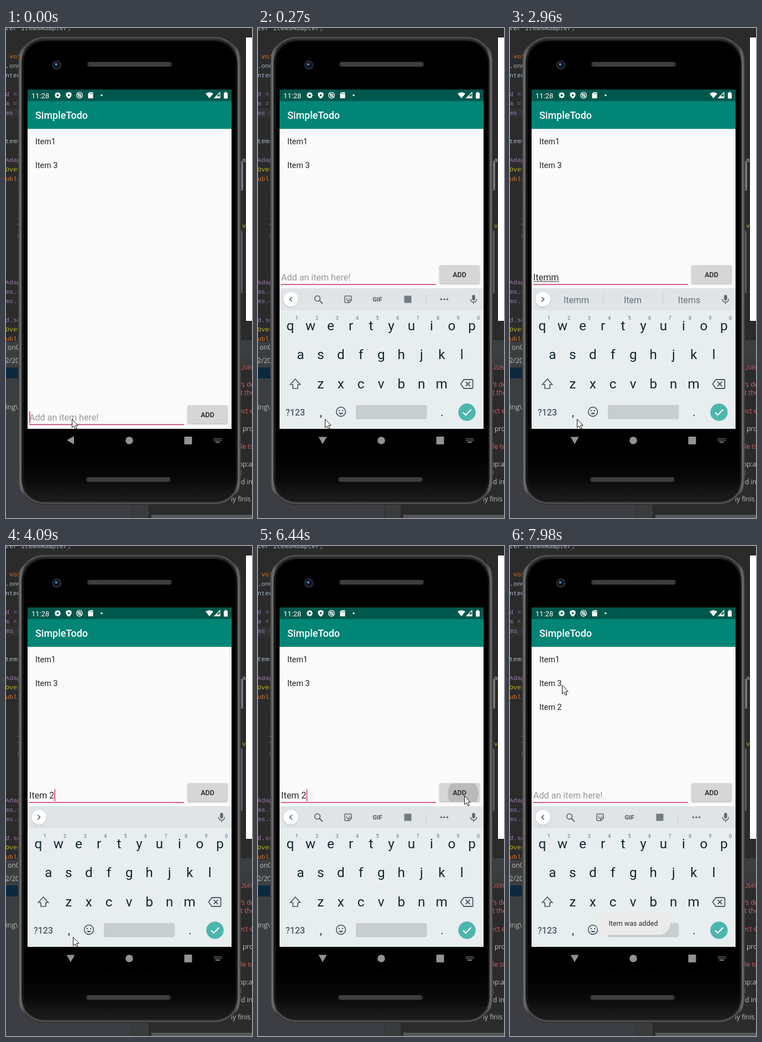
Recreate the animation shown at these times as an HTML page with a canvas. Size 445x885 px, loop 8000 ms.

```html
<!DOCTYPE html>
<html lang="en">
<head>
<meta charset="utf-8">
<title>Todo list</title>
<style>
html, body { margin: 0; width: 100%; height: 100%; overflow: hidden; background: #2b2b2b; }
canvas { display: block; }
</style>
</head>
<body>
<canvas id="stage" width="445" height="885"></canvas>
<script>
const c = document.getElementById('stage').getContext('2d');
const LOOP = 8000;
const ROBOTO = 'Roboto, sans-serif';
const MONO = '"Liberation Mono", monospace';
const SANS = '"Open Sans", sans-serif';
const ICON = '#5c686e';

// Step tracks: [start time, value...]
const typed = [[0, ''], [1700, 'I'], [1940, 'It'], [2090, 'Ite'], [2400, 'Itemm'],
  [3390, 'Item'], [3940, 'Item '], [4090, 'Item 2'], [6590, '']];
const strips = [[0, null], [1820, ['I', 'I\'m', 'I\'ll']], [1940, ['It', 'It\'s', 'Its']],
  [2090, ['Ite', 'Item', 'Its']], [2400, ['Itemm', 'Item', 'Items']],
  [3390, ['Items', 'Item', 'Item\'s']], [4090, []], [4240, null]];
const caretToggles = [270, 830, 1270, 1700, 2960, 3390, 3820, 3940, 4520, 5030, 5540, 6010, 7010, 7430, 7980];
const pointer = [[0, 119, 706], [120, 121, 706], [4790, 205, 640], [4910, 325, 548], [5030, 405, 469],
  [5180, 412, 467], [5300, 403, 458], [5420, 386, 453], [5540, 373, 451],
  [7160, 232, 330], [7280, 105, 228], [7580, 98, 241], [7700, 94, 251]];
const ripples = [[0, 0, 0], [6440, 28, .13], [6590, 38, .13], [6740, 44, .07], [6860, 0, 0]];
const toasts = [[0, 0], [6590, .3], [6740, .6], [6860, .85], [7010, 1]];

const at = (track, t) => track.findLast(step => step[0] <= t);

function rect(x, y, w, h, fill) {
  c.fillStyle = fill;
  c.fillRect(x, y, w, h);
}
function round(x, y, w, h, r, fill) {
  c.beginPath();
  c.roundRect(x, y, w, h, r);
  c.fillStyle = fill;
  c.fill();
}
function disc(x, y, r, fill) {
  c.beginPath();
  c.arc(x, y, r, 0, 7);
  c.fillStyle = fill;
  c.fill();
}
function ring(x, y, r, color, width = 1.6) {
  c.beginPath();
  c.arc(x, y, r, 0, 7);
  c.strokeStyle = color;
  c.lineWidth = width;
  c.stroke();
}
function path(d, color, width, x = 0, y = 0) {
  c.save();
  c.translate(x, y);
  const p = new Path2D(d);
  if (width) {
    c.strokeStyle = color;
    c.lineWidth = width;
    c.stroke(p);
  } else {
    c.fillStyle = color;
    c.fill(p);
  }
  c.restore();
}
function text(s, x, y, size, color, align = 'left', weight = 400, family = ROBOTO) {
  c.font = `${weight} ${size}px ${family}`;
  c.textAlign = align;
  c.fillStyle = color;
  c.fillText(s, x, y);
}

function drawEditor() {
  rect(0, 0, 445, 885, '#2b2b2b');
  rect(0, 145, 35, 17, '#323232');
  const plain = '#a9b7c6', violet = '#9876aa', orange = '#cc7832', yellow = '#bbb529';
  const code = [
    ['ter itemsAdapter;', 4, plain], [' voi', 55, orange], ['.onC', 72, plain], ['nten', 89, plain],
    ['d =', 123, violet], ['m =', 140, violet], ['ms =', 157, violet], ['tems', 208, plain],
    ['Adap', 242, violet], ['Over', 259, yellow], ['ubli', 276, orange],
    ['   i', 293, plain], ['   .', 310, plain], ['   .', 327, plain], ['   i', 344, plain],
    ['   T', 361, plain], ['   s', 378, plain], ['Adap', 463, violet], ['ms.s', 480, violet],
    ['ms.s', 497, violet], ['d.se', 531, violet], ['Over', 548, yellow], ['ubli', 565, orange]
  ];
  for (const [s, y, color] of code) text(s, -1, y, 11.7, color, 'left', 400, MONO);

  rect(0, 567, 40, 318, '#3c3f41');
  rect(0, 588, 40, 1, '#303234');
  rect(0, 613, 30, 20, '#0d293e');
  text('onC', 3, 581, 12, '#bbbbbb', 'left', 400, SANS);
  text('22/20', -8, 605, 12, '#bbbbbb', 'left', 400, SANS);
  text('ing\\', 0, 689, 12, '#bbbbbb', 'left', 400, SANS);
  rect(0, 820, 229, 65, '#3d3e43');
  rect(228, 850, 30, 35, '#393b3d');
  rect(228, 850, 1, 35, '#2e3032');
  rect(263, 879, 182, 6, '#555759');

  rect(433, 16, 12, 514, '#111');
  rect(434, 17, 11, 512, '#fff');
  text('a', 427, 242, 11.7, plain, 'left', 400, MONO);
  text('v', 427, 361, 11.7, yellow, 'left', 400, MONO);
  rect(410, 564, 35, 25, '#3c3f41');
  rect(410, 589, 35, 22, '#393b3d');
  const log = [['user', 617, 1, 423], ["'s de", 648, 1, 424], ['t the', 663, 1, 424], ['ect e', 696, 1, 421],
    ['proj', 728, 0, 428], ['ble to', 760, 1, 417], ['op:a', 792, 0, 421], ['d', 808, 0, 419],
    ['d in', 824, 0, 425], ['ly finis', 855, 0, 407]];
  for (const [s, y, red, x] of log) text(s, x, y, 12, red ? '#d8605f' : '#c0c0c0', 'left', 400, SANS);
}

function drawSpeaker(x, y) {
  round(x, y, 153, 9, 4.5, '#353535');
  c.setLineDash([1, 2]);
  path('M4 3H149M5 6H149', '#858585', 1, x, y);
  c.setLineDash([]);
}

function drawPhone() {
  round(422, 240, 7, 54, 2, '#66686a');
  round(422, 366, 6, 113, 2, '#5b5d5f');
  rect(427, 244, 1, 46, '#999');
  const metal = c.createLinearGradient(22, 0, 425, 0);
  metal.addColorStop(0, '#333');
  metal.addColorStop(.012, '#747474');
  metal.addColorStop(.03, '#303030');
  metal.addColorStop(.97, '#303030');
  metal.addColorStop(.988, '#6c6c6c');
  metal.addColorStop(1, '#303030');
  round(22, 15, 403, 846, 47, metal);
  c.beginPath();
  c.roundRect(24.5, 17.5, 398, 841, 45);
  c.strokeStyle = '#626262';
  c.lineWidth = 1.5;
  c.stroke();
  round(28, 22, 391, 833, 41, '#181818');
  const face = c.createLinearGradient(0, 765, 0, 853);
  face.addColorStop(0, '#000');
  face.addColorStop(.55, '#080808');
  face.addColorStop(1, '#1d1d1d');
  round(32, 24, 384, 828, 38, face);
  disc(92, 67, 8.5, '#26282d');
  disc(92, 67, 5.5, '#0a1020');
  disc(91, 66, 2.5, '#33579b');
  disc(90.5, 65.5, 1, '#b6caec');
  drawSpeaker(147, 61);
  drawSpeaker(145, 811);
}

function drawStatusBar() {
  rect(39, 111, 369, 21, '#00574b');
  text('11:28', 46, 126.5, 13, '#fff');
  ring(93.5, 121.5, 3.3, '#fff', 2.4);
  for (let i = 0; i < 8; i++) {
    const a = i * Math.PI / 4;
    disc(93.5 + 4.7 * Math.cos(a), 121.5 + 4.7 * Math.sin(a), 1.1, '#fff');
  }
  path('M0-6L5-4V0Q4 4 0 6Q-4 4-5 0V-4Z', '#fff', 0, 113.5, 121.5);
  disc(113.5, 121.5, 1.8, '#00574b');
  ring(133, 121.5, 5.3, '#fff', 1.3);
  ring(133, 121.5, 2.4, '#fff', 1.2);
  path('M-4-4L4 4', '#fff', 1.2, 133, 121.5);
  path('M-2-5.5H4.5V5.5H-4.5V-3Z', '#fff', 0, 153, 121.5);
  path('M-1.5-4V-2M.8-4V-2M3-4V-2', '#00574b', 1, 153, 121.5);
  disc(173, 121.5, 1.7, '#fff');
  path('M0 5.5L-7-3Q0-8 7-3Z', '#fff', 0, 368, 121.5);
  path('M5-5V5H-5Z', '#fff', 1.2, 382, 121.5);
  path('M5-5V5H-5L0 0V2H5Z', '#fff', 0, 382, 121.5);
  round(394, 117, 7, 10.5, 1, '#fff');
  rect(396, 115.5, 3, 2, '#fff');
}

function drawNavBar(t) {
  c.save();
  c.translate(117, 744.5);
  c.rotate(t < 120 ? Math.PI / 2 : t < 270 ? Math.PI / 5 : 0);
  path('M-7.5-6H7.5L0 7Z', '#929292');
  c.restore();
  disc(223, 745, 6.8, '#929292');
  round(322.5, 738, 14, 14, 1, '#929292');
  c.setLineDash([1.7, 1.3]);
  path('M376 742H391M376 745H391', '#aaa', 1.7);
  c.setLineDash([]);
  path('M379 748H387', '#aaa', 1.5);
}

function drawEntry(t, y) {
  const value = at(typed, t)[1];
  text(value || 'Add an item here!', 42, y - 7.5, 16.1, value ? '#262626' : '#999');
  const width = value ? c.measureText(value).width : 0;
  if (value && t < 3940) rect(43, y - 6, width - 1, 1, '#333');
  rect(42, y - 1, 280, 1.6, '#c73b6c');
  const lit = caretToggles.filter(x => x <= t).length % 2 === 0;
  if (lit) rect(42.3 + width, y - 24, 1.5, 21.5, '#d32f6b');

  c.save();
  c.shadowColor = 'rgba(0,0,0,.3)';
  c.shadowBlur = 2.5;
  c.shadowOffsetY = 1;
  round(328.5, y - 35, 72.5, 33, 2, '#d5d6d6');
  c.restore();
  const [, r, alpha] = at(ripples, t);
  if (r) {
    c.save();
    c.beginPath();
    c.rect(328.5, y - 35, 72.5, 33);
    c.clip();
    disc(371, y - 16, r, `rgba(0,0,0,${alpha})`);
    c.restore();
  }
  text('ADD', 364.5, y - 14, 12.5, '#202020', 'center', 500);
}

function drawToolbar() {
  ring(107.5, 488.5, 4.8, ICON, 1.8);
  path('M111 492L117 498', ICON, 2);
  path('M-5-6H5Q6-6 6-5V2L2 6H-5Q-6 6-6 5V-5Q-6-6-5-6ZM6 1H3Q1 1 1 3V6M-3 0Q0 4 2 1', ICON, 1.5, 163, 490);
  disc(160.5, 488, 1, ICON);
  disc(165.5, 488, 1, ICON);
  text('GIF', 216, 494, 11.5, ICON, 'center', 900);
  rect(264.5, 483.5, 13, 13, '#727c82');
  rect(303.5, 480, 1, 21, '#ccd1d5');
  for (const x of [331.5, 337, 342.5]) disc(x, 490, 1.8, ICON);
}

function drawStrip(t) {
  rect(39, 470, 369, 40, '#e0e4e7');
  const words = at(strips, t)[1];
  if (!words) drawToolbar();
  else words.forEach((word, i) => {
    text(word, 120 + 102 * i, 496.5, 16, '#637078', 'center');
    if (i) rect(60 + 108 * i, 479, 1, 22, '#c5cbcf');
  });
  c.save();
  c.shadowColor = 'rgba(0,0,0,.2)';
  c.shadowBlur = 2;
  c.shadowOffsetY = 1;
  disc(59.5, 490, 13.3, '#fff');
  c.restore();
  path(words ? 'M-2-4L2 0L-2 4' : 'M2-4L-2 0L2 4', '#4f5b61', 1.7, 59.5, 490);
  round(387.3, 482, 5.4, 10, 2.7, ICON);
  path('M384.5 489.5Q384.5 495 390 495Q395.5 495 395.5 489.5M390 495V498.5', ICON, 1.6);
}

function drawKeys(t) {
  const upper = t >= 1700 && t < 1820;
  const dark = '#13272f';
  const rows = [['qwertyuiop', 58.5, 545.5], ['asdfghjkl', 76.8, 598], ['zxcvbnm', 113.2, 650.5]];
  for (const [letters, x, y] of rows) [...letters].forEach((key, i) => {
    text(upper ? key.toUpperCase() : key, x + 36.5 * i, y, 24.3, dark, 'center');
  });
  for (let i = 0; i < 10; i++) text((i + 1) % 10, 70 + 36.5 * i, 526.5, 9.3, '#64737b', 'center');

  const shift = 'M0-9L9 1H4.5V8H-4.5V1H-9Z';
  if (upper) path(shift, '#4c5b62', 0, 67.5, 643);
  else path(shift, '#4c5b62', 1.7, 67.5, 643);
  path('M-11 0L-5-8H10Q11-8 11-7V7Q11 8 10 8H-5ZM-2-4L6 4M6-4L-2 4', '#4c5b62', 1.8, 377.5, 643);

  text('?123', 67.5, 699.5, 16, '#4c5b62', 'center', 500);
  text(',', 114, 701, 20, dark, 'center');
  text('.', 333, 701, 20, dark, 'center');
  ring(150, 693, 8.3, '#4c5b62', 1.7);
  disc(147, 691, 1.3, '#4c5b62');
  disc(153, 691, 1.3, '#4c5b62');
  path('M145.5 695Q150 701 154.5 695Z', '#4c5b62');
  round(177, 681, 128.5, 25.5, 3, '#c8cdd0');
  disc(378, 694, 15.7, '#4db6ac');
  path('M371 694.5L375.8 699L385.5 689', '#fff', 2);
}

function drawKeyboard(t) {
  c.save();
  c.beginPath();
  c.rect(39, 470, 369, 254);
  c.clip();
  if (t < 270) {
    c.globalAlpha = .85;
    c.translate(0, 14);
  }
  rect(39, 470, 369, 254, '#e8edf0');
  drawStrip(t);
  drawKeys(t);
  c.restore();
}

function drawToast(t) {
  const alpha = at(toasts, t)[1];
  if (!alpha) return;
  c.save();
  c.globalAlpha = alpha;
  round(156, 660, 134, 42.5, 21, '#ebebeb');
  text('Item was added', 223, 685.5, 12.6, '#2c2c2c', 'center');
  c.restore();
}

function drawPointer(t) {
  const [, x, y] = at(pointer, t);
  const arrow = 'M.5.5V16L4 12.7L6.6 18.5L9 17.4L6.5 11.8H11.2Z';
  path(arrow, '#fff', 0, x, y);
  path(arrow, '#111', 1, x, y);
}

function draw(t) {
  drawEditor();
  drawPhone();
  rect(39, 111, 369, 613, '#fafafa');
  drawStatusBar();
  rect(39, 132, 369, 50, '#008577');
  rect(39, 182, 369, 1, '#d5dddb');
  text('SimpleTodo', 53, 164, 17.95, '#fff', 'left', 500);
  const items = ['Item1', 'Item 3'];
  if (t >= 6590) items.push('Item 2');
  items.forEach((item, i) => text(item, 53, 209.5 + 43 * i, 14.4, '#222'));
  const open = t >= 120;
  drawEntry(t, open ? 463.5 : 716.5);
  if (open) drawKeyboard(t);
  drawToast(t);
  drawNavBar(t);
  drawPointer(t);
}

function tick() {
  draw(performance.now() % LOOP);
  requestAnimationFrame(tick);
}
tick();
</script>
</body>
</html>
```
